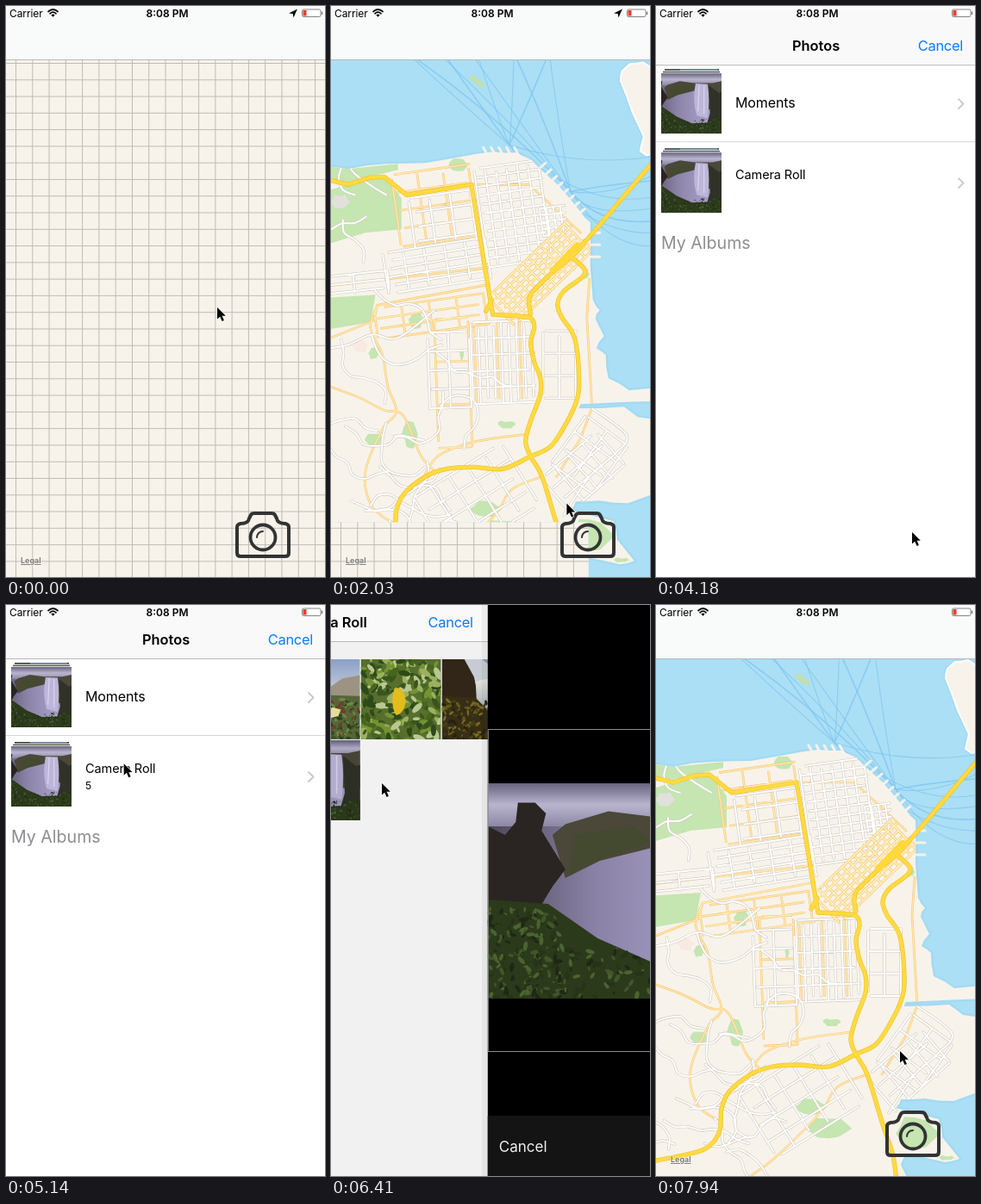
An HTML page that plays this animation: 370x663 px, repeating every 7990 ms.

```html
<!DOCTYPE html>
<html lang="en">
<head>
<meta charset="utf-8">
<title>Map and photo picker</title>
<style>
html, body { margin: 0; width: 100%; height: 100%; overflow: hidden; background: #fff; }
svg { display: block; width: 100vw; height: 100vh; }
text { font-family: Inter, Roboto, sans-serif; }
.line { fill: none; stroke-linejoin: round; stroke-linecap: round; }
.nav { font-size: 16.4px; letter-spacing: -.25px; }
.bold { font-weight: 600; }
.nav.bold { letter-spacing: 0; }
.blue { fill: #0a7aff; }
</style>
</head>
<body>
<svg id="stage" viewBox="0 0 370 663"></svg>
<script>
const W = 375, H = 663, LOOP = 7990;

let seed = 11;
const rnd = (a = 0, b = 1) => a + (b - a) * (seed = seed * 16807 % 2147483647) / 2147483647;
const times = (n, f) => Array.from({ length: n }, (_, i) => f(i));
const fix = p => p.map(v => v.toFixed(1)).join(' ');

// ---------- drawing helpers ----------
const poly = (d, fill) => `<path d="${d}" fill="${fill}"/>`;
const line = (d, color, w, more = '') =>
  `<path class="line" d="${d}" stroke="${color}" stroke-width="${w}" ${more}/>`;
const rect = (x, y, w, h, fill, more = '') =>
  `<rect x="${x}" y="${y}" width="${w}" height="${h}" fill="${fill}" ${more}/>`;
const text = (x, y, s, more = '') => `<text x="${x}" y="${y}" ${more}>${s}</text>`;
const road = (d, color, edge, w) => line(d, edge, w + 1.3) + line(d, color, w);
const points = s => s.split(' ').map(q => q.split(',').map(Number));

// smooth curve through every point
function curve(p) {
  const at = i => p[Math.max(0, Math.min(p.length - 1, i))];
  const ctrl = (a, b, c) => [b[0] + (c[0] - a[0]) / 6, b[1] + (c[1] - a[1]) / 6];
  return `M${fix(p[0])}` + p.slice(1).map((q, i) =>
    `C${fix(ctrl(at(i - 1), at(i), q))} ${fix(ctrl(at(i + 2), q, at(i)))} ${fix(q)}`).join('');
}

// closed outline with every edge broken once
const jag = (p, amp) => 'M' + p.map((q, i) => {
  const n = p[(i + 1) % p.length];
  return `${fix(q)}L${fix([0, 1].map(k => (q[k] + n[k]) / 2 + rnd(-amp, amp)))}`;
}).join('L') + 'Z';

const blob = (x, y, rx, ry) => jag(times(6, i => {
  const a = i * Math.PI / 3, r = rnd(.8, 1.1);
  return [x + rx * r * Math.cos(a), y + ry * r * Math.sin(a)];
}), 1.5);

// street grid: origin, size, tilt in degrees, spacing across and down
function district(x, y, w, h, deg, du, dv) {
  const c = Math.cos(deg * Math.PI / 180), s = Math.sin(deg * Math.PI / 180);
  const at = (u, v) => fix([x + u * c - v * s, y + u * s + v * c]);
  const cut = n => n * rnd(0, .1);
  const down = times(Math.floor(w / du) + 1, i => `M${at(i * du, cut(h))}L${at(i * du, h - cut(h))}`);
  const across = times(Math.floor(h / dv) + 1, i => `M${at(cut(w), i * dv)}L${at(w - cut(w), i * dv)}`);
  return down.concat(across).join('');
}

// hill road that keeps turning a little
function wander(x, y, steps) {
  let a = rnd(0, 6.3);
  return curve(times(steps, () => {
    a += rnd(-.9, .9);
    return [x += 15 * Math.cos(a), y += 15 * Math.sin(a)];
  }));
}

const specks = (n, x, y, w, h, size, colors) => times(n, i => {
  const r = size * rnd(.5, 1.5);
  return `<ellipse rx="${r.toFixed(1)}" ry="${(r * .45).toFixed(1)}" fill="${colors[i % colors.length]}" transform="translate(${fix([x + rnd(0, w), y + rnd(0, h)])}) rotate(${rnd(0, 180).toFixed()})"/>`;
}).join('');

// ---------- map ----------
const LAND = jag(points('-20,182 20,188 65,182 110,181 150,174 188,168 215,169 232,177 262,205 290,238 301,250 301,300 304,340 312,352 307,362 317,382 308,396 319,404 322,431 346,445 392,443 392,457 290,461 288,466 340,464 356,476 392,482 392,556 345,576 312,573 284,574 278,584 328,597 332,618 352,643 335,647 292,638 284,650 296,680 -20,680'), 1.3);
const ISLAND = jag(points('336,85 338,74 347,66 362,64 380,74 390,168 366,172 359,167 363,150 350,122'), .5);

function buildMap() {
  const harbor = [207, 160], dock = [278, 214];
  const ferries = times(10, i => {
    const [x, y] = i % 2 ? harbor : dock, top = i * 32 - 10;
    return `M${top} -10Q${(top + x) / 2 + 22 - i * 3} ${95 + rnd(-15, 25)} ${x} ${y}`;
  }).concat(times(8, i => {
    const [x, y] = i % 3 ? dock : harbor, end = 170 + i * 15;
    return `M${x} ${y}Q${300 + rnd(0, 30)} ${end + rnd(0, 40)} 392 ${end}`;
  }));
  const piers = times(5, i => `M${182 + i * 9} 172l-5 -9`)
    .concat(times(8, i => `M${240 + i * 6.5} ${189 + i * 7.6}l9 -8`), times(3, i => `M299 ${262 + i * 14}h13`)).join('');

  const parks = 'M0 212L40 200H66L82 222V258L40 262L0 274Z M0 184L20 188L78 182V189L20 203L0 200Z M-14 338L52 334L46 366L-14 376Z' +
    blob(148, 183, 11, 8) + blob(99, 363, 9, 10) + blob(50, 402, 8, 8) + blob(152, 404, 3, 5) + blob(204, 485, 12, 5) +
    blob(92, 496, 10, 20) + blob(50, 503, 12, 8) + blob(180, 582, 18, 10) + blob(200, 608, 28, 13) +
    blob(302, 614, 27, 22) + blob(296, 310, 4, 7) + blob(338, 642, 10, 3);

  const white = [
    district(90, 222, 78, 60, -8, 24, 17), district(166, 188, 78, 116, -8, 12.5, 10.5),
    district(60, 286, 126, 48, -9, 24, 9.5), district(-14, 314, 80, 22, -6, 40, 10),
    district(242, 234, 30, 32, -8, 8, 8), district(162, 366, 73, 96, -2, 8.8, 19),
    district(112, 378, 48, 90, -2, 24, 22), district(246, 376, 39, 80, 0, 19, 26),
    district(244, 548, 84, 54, -41, 21, 17), district(296, 474, 60, 70, 36, 30, 23),
    district(96, 570, 120, 84, -32, 24, 21),
    times(22, () => wander(rnd(-10, 150), rnd(380, 640), 8)).join(''),
    times(4, i => wander(15 + i * 18, 232, 5)).join(''),
    curve(points('-14,398 20,392 48,380 78,384 120,352')), curve(points('303,466 343,497 328,520 300,545 270,590'))
  ].join('');
  const orange = [
    district(70, 195, 94, 84, -8, 30, 21), district(50, 350, 132, 36, -8, 32, 12),
    district(166, 366, 68, 98, -2, 26.4, 38), district(120, 362, 40, 150, -2, 39, 50),
    'M300 316L297 360L303 465L290 500L262 545M-14 325L184 302M0 384L50 364L54 346L184 322M163 206L230 206L290 262',
    curve(points('54,346 46,372 60,404 66,440 76,470 60,490 40,540 48,580 74,600')),
    curve(points('-14,436 30,452 62,468 84,474 104,520 120,538')),
    curve(points('108,545 126,520 170,504 226,496')), curve(points('245,545 210,560 190,590 140,640 110,663'))
  ].join('');
  const downtown = district(182, 337, 132, 46, -44, 9.5, 7.5);

  const highways = ['M-14 200L0 201L20 206L45 198L62 197L88 218L163 206L187 352L188 357M180 353L187 340',
    '188,357 222,359 233,362 236,372 232,390 236,412 243,430 243,450 232,480 226,504 232,522 245,545 262,600 275,640 280,680',
    '395,156 370,184 290,278 255,310 233,332 230,344 232,356',
    '276,288 295,308 270,330 263,345 268,360 283,385 288,435 284,460 272,485 255,510 231,522 200,536 165,534 135,536 110,545 85,565 76,585 74,610 62,628 40,637 -16,648'
  ].map((d, i) => i ? curve(points(d)) : d).join('');

  return rect(-30, -60, 440, 760, '#abdff5') +
    ferries.map((d, i) => line(d, '#7fc6f0', i % 3 ? 1.1 : 1.6, 'opacity=".75"')).join('') +
    line(LAND + ISLAND, '#9bd5ef', 5, 'opacity=".5"') + line(piers, '#f4f1ea', 3) +
    poly(LAND + ISLAND, '#f7f3eb') + line(ISLAND, '#fff', 2) + poly('M160 82L165 79L178 89V94L170 91Z', '#c3dfae') +
    `<g clip-path="url(#land)">` + poly(parks, '#c5e5b1') + poly(blob(10, 226, 12, 9), '#e2e0dc') + poly(blob(34, 393, 12, 8), '#f8e9e1') +
    road(orange, '#ffebb8', '#fac76f', 1.3) + road(white, '#fff', '#d2ccc2', 1.9) + road(downtown, '#fff0c4', '#fac563', 1.8) + '</g>' +
    road(highways, '#ffdb40', '#f3c12f', 4) + line('M258 306L286 277', '#ffd83a', 8);
}

const grid = line(times(19, i => `M${11.5 + i * 19.28} 62V663`).join('') +
  times(31, i => `M0 ${66.5 + i * 19.28}H370`).join(''), '#bfbcb4', 1);

const camera = line('M272 601Q281 601 282 595L284 591Q285 589 288 589H308Q311 589 312 591L314 595Q315 601 324 601Q328 602 328 605V635Q328 639 324 639H272Q268 639 268 635V605Q268 602 272 601Z', '#333', 4) +
  `<circle cx="298" cy="617" r="14.5" fill="none" stroke="#333" stroke-width="3.8"/>` +
  line('M291 617A7 7 0 0 1 298 610', '#333', 2);

// ---------- status bar ----------
const status = text(4, 12.6, 'Carrier', 'font-size="12" letter-spacing="-.1"') +
  line('M49 6.5Q54.5 1.5 60 6.5M51 8.8Q54.5 5.6 58 8.8', '#000', 1.7) + poly('M52.4 10.4Q54.5 8.6 56.6 10.4L54.5 12.8Z', '#000') +
  text(187, 12.6, '8:08 PM', 'font-size="12" class="bold" text-anchor="middle"') +
  `<path id="gps" d="M328 8.6L338 3.5L333.4 13.5L332.8 9Z"/>` +
  rect(343.5, 4, 21.5, 8.5, '#fff', 'rx="1.8" stroke="#777" stroke-width=".9"') +
  rect(344.5, 5, 4, 6.5, '#f33b30') + rect(365.8, 6.6, 1.4, 3.4, '#777');

// ---------- photos ----------
const photo = (id, w, body) =>
  `<symbol id="${id}" viewBox="0 0 ${w} 100" preserveAspectRatio="xMidYMid slice">${body}</symbol>`;
const fade = (id, x2, y2, ...colors) => `<linearGradient id="${id}" x2="${x2}" y2="${y2}">` +
  colors.map((c, i) => `<stop offset="${i / (colors.length - 1)}" stop-color="${c}"/>`).join('') + '</linearGradient>';
const bush = ['#3f5727', '#263318', '#4a6430', '#1e2814'];

const photos = fade('sky', 0, 1, '#93a9d2', '#dfe3ee', '#dfe3ee') + fade('clouds', 0, 1, '#67637f', '#b9b5cf', '#8c88a4') +
  fade('mist', 1, 0, '#4d4858', '#8a82a6', '#a89fc8', '#6d6786') + fade('foam', 0, 1, '#f4f1ea', '#a9b3bd') +
  photo('dunes', 100, rect(0, 0, 100, 100, 'url(#sky)') + poly('M0 44L30 34L58 38L78 24L100 20V60H0Z', '#a69b8a') +
    poly('M0 52L40 44L100 46V100H0Z', '#5c6c3c') + specks(200, 0, 50, 100, 50, 3, ['#3c5724', '#74904a', '#74402e', '#2b461c']) +
    line('M2 8L36 46M0 20L26 48', '#56605f', .8) + poly('M57 64L66 60L76 63L73 71L64 73Z', '#f3ea9a')) +
  photo('leaf', 100, rect(0, 0, 100, 100, '#5b7530') +
    specks(220, 0, 0, 100, 100, 6, ['#7b9c35', '#314d1a', '#a4bb64', '#4a6c20', '#c3d29a', '#3d5a1e']) +
    poly('M42 36Q54 34 56 52Q54 68 44 70Q36 56 42 36Z', '#f0c81e')) +
  photo('cliff', 100, rect(0, 0, 100, 100, '#8fa5c4') + poly('M20 0H50L70 16L100 14V40H20Z', '#d3d8e0') +
    poly('M0 0H28L40 22L46 50H0Z', '#35281a') + poly('M42 28Q70 18 100 34V66H44Z', 'url(#foam)') +
    poly('M0 46L42 48L60 66L100 76V100H0Z', '#3a3117') + specks(130, 0, 52, 76, 48, 3, ['#6a5f1c', '#2a2410', '#80702a', '#4b4018'])) +
  photo('rapids', 100, rect(0, 0, 100, 100, '#25272c') + poly('M30 0H54L46 30L66 54L100 60V100H0V70L22 40Z', '#c5cfdf') +
    line('M40 4Q34 40 8 96M46 30Q44 60 30 98M50 50Q66 70 70 98', '#8fa2bd', 4) + poly('M56 0H100V54L70 46L58 26Z', '#2c2d20')) +
  photo('fall', 150, rect(0, 0, 150, 100, 'url(#mist)') + rect(0, 0, 150, 20, 'url(#clouds)') +
    poly('M30 24L36 19L56 13L80 16L110 16L150 8V60H104L84 28L52 36L36 44Z', '#4b4739') +
    poly('M40 24L68 20L76 27L50 36L38 42Z', '#434a30') +
    poly('M82 17L102 18Q106 44 102 74L84 70Q76 46 82 17Z', '#bdb6da') + line('M88 19L86 62M96 20V66', '#dcd7ee', 1.6) +
    poly('M0 20L8 24L13 18L14 9L22 9L27 14L25 22L36 40L30 48L24 58H0Z', '#2a2522') +
    poly('M104 20L120 32L150 26V100H96L106 66Z', '#2f3226') +
    poly('M0 54L28 56L51 72L76 83L102 82L150 64V100H0Z', '#2c3a1c') +
    specks(170, 0, 58, 34, 42, 1.5, bush) + specks(170, 30, 76, 120, 24, 1.5, bush));

const pic = (id, x, y, w, h) => `<use href="#${id}" x="${x}" y="${y}" width="${w}" height="${h}"/>`;

// ---------- picker screens ----------
const row = y => rect(10, y - 5, 63, 1.6, '#2f3d40') + rect(28, y - 4.6, 43, 1, '#8fb2cc') +
  rect(8, y - 2.4, 66, 1.6, '#55584a') + pic('fall', 6, y, 70, 70) +
  line(`M351 ${y + 30}l5.5 5.5l-5.5 5.5`, '#c7c7cc', 1.8);

const list = rect(0, 0, 370, H, '#fff') + rect(0, 154, 370, 90, '#d9d9d9', 'id="picked"') +
  rect(0, 151, 370, 1, '#d8d7db') + row(72) + row(164) +
  text(92, 111.5, 'Moments', 'font-size="16" letter-spacing="-.1"') +
  text(92, 195, 'Camera Roll', 'font-size="14.5" letter-spacing="-.1"') +
  text(92, 214, '5', 'id="count" font-size="12"') +
  text(6, 276, 'My Albums', 'font-size="19.6" fill="#8e8e93"');

const album = rect(0, 0, W, H, '#fff') +
  ['dunes', 'leaf', 'cliff', 'rapids', 'fall'].map((id, i) =>
    pic(id, i % 4 * 94, 63 + (i >> 2) * 94, 93, 93)).join('');

const nav = rect(-2, 0, W, 62, '#f9f9f9') + rect(-2, 62, W, 1, '#b9b9bb') +
  line('M17 31L8.5 40L17 49', '#0a7aff', 2.6, 'id="back"') +
  text(0, 46, 'Photos', 'id="title" class="nav bold"') + text(0, 46, 'Photos', 'id="backText" class="nav blue"') +
  text(0, 46, 'Camera Roll', 'id="title2" class="nav bold" text-anchor="middle"') +
  text(356, 46, 'Cancel', 'class="nav blue" text-anchor="end"');

const crop = rect(-7, 0, 7, H, '#000', 'opacity=".05"') + rect(0, 0, W, H, '#000') + pic('fall', 0, 207, W, 250) +
  `<rect x=".5" y="144.5" width="374" height="374" fill="none" stroke="#8c8c8c"/>` + rect(0, 593, W, 70, '#141414') +
  text(13, 635, 'Cancel', 'font-size="17" fill="#f0f0f0"') +
  text(361, 635, 'Choose', 'font-size="17" fill="#f0f0f0" text-anchor="end"');

document.getElementById('stage').innerHTML = `<defs>${photos}
  <clipPath id="land"><path d="${LAND}"/></clipPath><clipPath id="tiles"><path id="loaded"/></clipPath></defs>
  ${rect(0, 0, 370, H, '#f7f3eb')}${grid}
  <g id="map"><g clip-path="url(#tiles)">${buildMap()}</g></g>
  ${text(17, 647, 'Legal', 'font-size="9" font-weight="600" fill="#77736c" stroke="#fff" stroke-opacity=".5" stroke-width="1.4" paint-order="stroke" text-decoration="underline"')}
  ${camera}${rect(0, 0, 370, 62, '#f9fafa')}${rect(0, 62, 370, 1, '#b7b9ba')}
  <g id="modal"><g id="list">${list}</g>${rect(0, 0, 370, H, '#000', 'id="dim"')}
    <g id="album">${album}</g>${rect(0, 0, 370, H, '#000', 'id="dim2"')}
    <g id="nav">${nav}</g><g id="crop">${crop}</g></g>
  <g id="status">${status}</g>
  <path id="cursor" d="M0 0V13.6L3.2 10.7L5.6 16L7.9 15L5.6 9.8H9.8Z" stroke="#fff" stroke-width="1.2" paint-order="stroke"/>`;

// ---------- motion ----------
const el = Object.fromEntries([...document.querySelectorAll('[id]')].map(e => [e.id, e]));
const move = (name, x, y) => el[name].setAttribute('transform', `translate(${x.toFixed(2)} ${y.toFixed(2)})`);
const show = (name, o) => el[name].setAttribute('opacity', Math.max(0, Math.min(1, +o)));

// share of the way still to go in a critically damped spring
const left = ms => ms <= 0 ? 1 : (1 + .018 * ms) * Math.exp(-.018 * ms);

// eased moves [from, to, x, y], resting in between
const follow = (t, home, moves) => moves.reduce(([x, y], [from, to, nx, ny]) => {
  const p = Math.max(0, Math.min(1, (t - from) / (to - from))), s = p * p * (3 - 2 * p);
  return [x + (nx - x) * s, y + (ny - y) * s];
}, home);

const OPEN = 3808, PUSH = 5389, CROP = 6316, CLOSE = 7390;
const PAN = [[1100, 1710, -4, 21], [1710, 2090, 0, 0]];
const POINTER = [
  [940, 1040, 236, 397], [1100, 1710, 245, 335], [1760, 2090, 276, 600], [2400, 2900, 276, 552],
  [3140, 3700, 297, 611], [4200, 4720, 142, 155], [4960, 5190, 136, 188], [5370, 5600, 137, 206],
  [5700, 6000, 59, 207], [6420, 7050, 322, 631], [7350, 7930, 283, 518]
];

function tiles(t, ox, oy) {
  if (t < 660) return 'M0 0';
  if (t < 960) return `M${129 - ox} ${341 - oy}h241v322h-241Z`;
  if (t < 2000) return 'M-30 -60H410V598H-30Z';
  if (t < 2390) return 'M-30 -60H410V700H299V598H-30Z';
  return 'M-30 -60H410V700H-30Z';
}

function draw(t) {
  const [ox, oy] = follow(t, [-13, 83], PAN);
  move('map', ox, oy);
  el.loaded.setAttribute('d', tiles(t, ox, oy));
  move('cursor', ...follow(t, [245, 350], POINTER));

  const drop = t < CLOSE ? left(t - OPEN) : 1 - left(t - CLOSE);
  move('modal', 0, H * drop);
  show('modal', t > OPEN && drop < .999);

  const r = left(t - PUSH), c = left(t - CROP), cropping = t >= CROP;
  move('list', -.3 * W * (1 - r), 0);
  show('picked', t >= 5340);
  show('count', t >= 4300);
  show('dim', .1 * (1 - r));
  move('album', -2 + W * r - .3 * W * (1 - c), 0);
  show('dim2', .11 * (1 - c));

  const tx = 26 + 132 * r;
  move('nav', -W * (1 - c), cropping ? -20 : 0);
  move('title', tx, 0);
  move('backText', tx, 0);
  show('title', r);
  show('backText', 1 - r);
  show('back', 1 - 8 * r);
  move('title2', 185.5 + 257 * r, 0);
  show('title2', 1 - r);

  move('crop', -2 + W * c, 0);
  show('crop', cropping);
  show('status', !cropping || t >= CLOSE);
  show('gps', t < OPEN);
}

const start = performance.now();
function tick() {
  draw((performance.now() - start) % LOOP);
  requestAnimationFrame(tick);
}
tick();
</script>
</body>
</html>
```
